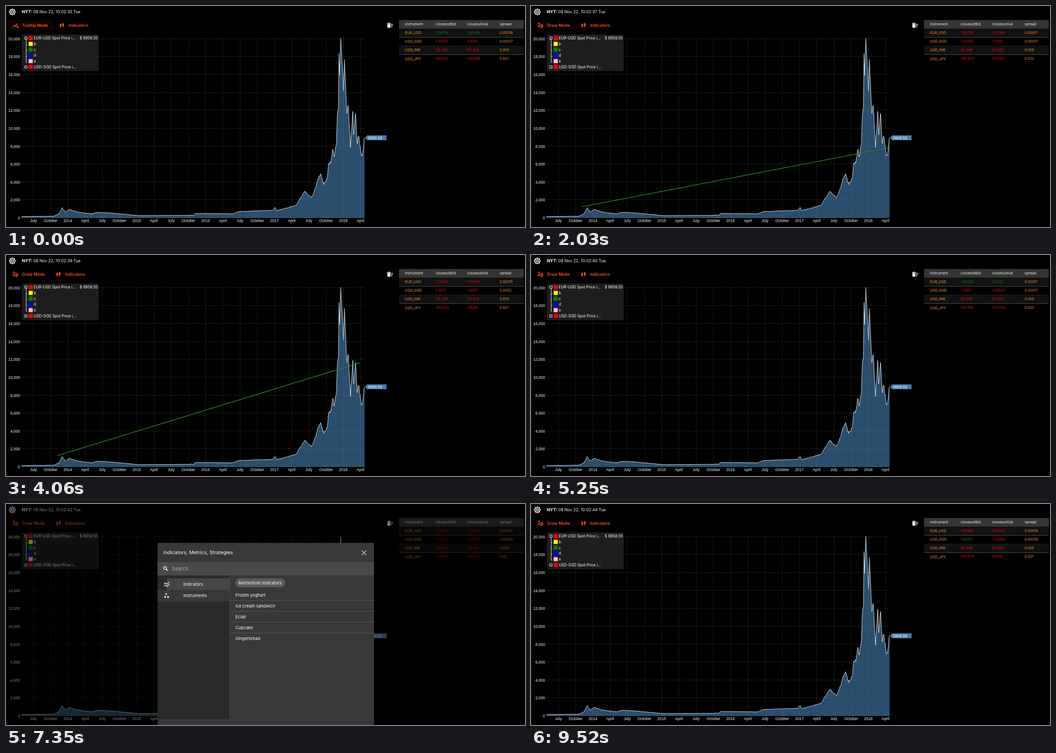
Animation, 1145 px wide and 489 px high, one loop 9.73 s. Source, as an HTML page with a canvas:

```html
<!DOCTYPE html>
<html lang="en">
<head>
<meta charset="utf-8">
<title>Market dashboard</title>
<style>
html, body { margin: 0; width: 100%; height: 100%; overflow: hidden; background: #000; }
canvas { display: block; width: 1145px; height: 489px; }
</style>
</head>
<body>
<canvas id="stage"></canvas>
<script>
const W = 1145, H = 489, LOOP = 9730;
const UI = 'Inter, "Noto Sans", sans-serif';
const AXIS = '"Liberation Sans", Arial, sans-serif';
const ORANGE = '#f9501c', AMBER = '#f79a35';

const dpr = window.devicePixelRatio || 1;
const stage = document.getElementById('stage');
const modalLayer = document.createElement('canvas');
const [screen, overlay] = [stage, modalLayer].map(c => {
  c.width = W * dpr;
  c.height = H * dpr;
  const g = c.getContext('2d');
  g.scale(dpr, dpr);
  return g;
});
let ctx = screen;

// ---- helpers ----
function text(s, x, y, size, color = '#fff', { weight = 400, align = 'left', font = UI } = {}) {
  ctx.font = `${weight} ${size}px ${font}`;
  ctx.textAlign = align;
  ctx.fillStyle = color;
  ctx.fillText(s, x, y + size * 0.362);
}

function rect(x, y, w, h, color, r = 0) {
  ctx.fillStyle = color;
  ctx.beginPath();
  ctx.roundRect(x, y, w, h, r);
  ctx.fill();
}

function stroke(points, color, width = 1) {
  ctx.strokeStyle = color;
  ctx.lineWidth = width;
  ctx.beginPath();
  points.forEach(([x, y]) => ctx.lineTo(x, y));
  ctx.stroke();
}

function disc(x, y, r, color) {
  ctx.fillStyle = color;
  ctx.beginPath();
  ctx.arc(x, y, r, 0, Math.PI * 2);
  ctx.fill();
}

function ring(x, y, r, color, width) {
  ctx.strokeStyle = color;
  ctx.lineWidth = width;
  ctx.beginPath();
  ctx.arc(x, y, r, 0, Math.PI * 2);
  ctx.stroke();
}

const smooth = u => u * u * (3 - 2 * u);
const ramp = (t, from, to) => Math.min(1, Math.max(0, (t - from) / (to - from)));
// Rises over one interval and falls over a later one.
const pulse = (t, a, b, c, d) => ramp(t, a, b) - ramp(t, c, d);
const mix = (a, b, u) => a + (b - a) * u;

// ---- chart ----
const LEFT = 34, RIGHT = 791, BASE = 469;
const STEP_X = 37.98, STEP_Y = 39.62;
const tickX = i => 60.5 + i * STEP_X;
const tickY = i => BASE - i * STEP_Y;

// Turning points of the price; the jitter between them is random.
const turns = [
  [34, 466], [106, 465], [117, 460], [124, 446], [131, 456], [139, 450], [160, 456.5],
  [190, 460], [200, 456.5], [225, 457.5], [295, 464], [415, 463], [418, 459], [500, 460],
  [511, 455], [588, 452], [594, 446], [597, 453], [640, 441], [650, 424], [659, 410],
  [674, 424], [684, 400], [688, 382], [694, 371], [701, 395], [709, 380], [712, 348],
  [717, 346], [721, 317], [724, 334], [729, 303], [731, 243], [733.5, 225], [734.6, 105],
  [735.8, 154], [738.5, 71], [744.6, 188], [746.5, 118], [752, 238], [755, 220],
  [760, 313], [765, 233], [767, 285], [771, 238], [775, 305], [778, 288], [784, 332],
  [787, 325], [791, 291]
];

function roughen(keys) {
  let seed = 11;
  const rnd = () => (seed = seed * 16807 % 2147483647) / 2147483647 - 0.5;
  const out = [];
  for (let i = 0; i < keys.length - 1; i++) {
    const [x0, y0] = keys[i], [x1, y1] = keys[i + 1];
    const n = Math.max(1, Math.round(x1 - x0));
    for (let k = 0; k < n; k++) {
      const u = k / n, y = mix(y0, y1, u);
      const amp = Math.min(9, 0.3 + (BASE - y) * 0.06);
      out.push([mix(x0, x1, u), k ? y + rnd() * amp : y]);
    }
  }
  return [...out, keys[keys.length - 1]];
}
const curve = roughen(turns);

function drawChart() {
  const grid = 'rgba(255,255,255,0.21)';
  ctx.setLineDash([2, 2]);
  for (let i = 0; i <= 10; i++) {
    const y = Math.round(tickY(i)) - 0.5;
    stroke([[LEFT, y], [RIGHT, y]], grid);
  }
  for (let i = 0; i < 20; i++) {
    const x = Math.floor(tickX(i)) + 0.5;
    stroke([[x, BASE], [x, 70]], grid);
  }
  ctx.setLineDash([]);

  ctx.fillStyle = 'rgba(70,130,180,0.6)';
  ctx.beginPath();
  [[LEFT, BASE], ...curve, [RIGHT, BASE]].forEach(p => ctx.lineTo(...p));
  ctx.fill();
  ctx.lineJoin = 'round';
  stroke(curve, '#dde5ec');

  for (let i = 0; i <= 10; i++) {
    text((i * 2000).toLocaleString('en-US'), 31, tickY(i), 8.5, '#fff', { align: 'right', font: AXIS });
  }
  for (let i = 0; i < 20; i++) {
    const label = ['July', 'October', 2014 + (i - 2) / 4, 'April'][i % 4];
    text(String(label), tickX(i), 475, 8.5, '#fff', { align: 'center', font: AXIS });
  }

  rect(797, 286.3, 42.5, 10.7, '#4a7dad');
  ctx.beginPath();
  [[792, 291.6], [797, 286.3], [797, 297]].forEach(p => ctx.lineTo(...p));
  ctx.fill();
  text('8958.55', 799, 291.7, 8.6, '#fff', { font: AXIS });
}

function drawTrend(t) {
  if (t < 1680 || t >= 4690) return;
  const grow = ramp(t, 1680, 1960);
  const lift = smooth(ramp(t, 2380, 2660));
  const x = mix(113, mix(788, 781, lift), grow);
  const y = mix(444, mix(314, 238.5, lift), grow);
  stroke([[113, 444], [x, y]], '#1c8a1c', 1.6);
}

function drawLegend() {
  rect(35, 63, 169.5, 81, 'rgba(38,38,38,0.8)', 4);
  stroke([[44.5, 74], [44.5, 124]], '#ddd');
  const rows = [
    ['EUR-USD Spot Price i...', '#f00'], ['b', '#ff0'], ['c', '#008000'],
    ['d', '#00f'], ['e', '#ffc0cb'], ['USD-SGD Spot Price i...', '#f00']
  ];
  rows.forEach(([label, color], i) => {
    const y = 71.2 + i * 12.7;
    rect(50, y - 4.5, 9, 9, color);
    text(label, 61.3, y, 8.3);
    if (label.length > 1) {
      ctx.strokeStyle = '#fff';
      ctx.lineWidth = 1;
      ctx.strokeRect(41.5, Math.round(y) - 2.5, 5, 5);
    } else {
      stroke([[44, y + 2], [47, y + 2]], '#ddd');
    }
  });
  text('$ 8958.55', 202.5, 71, 8.3, '#fff', { align: 'right' });
}

// ---- toolbar ----
function gearIcon(x, y) {
  const pts = [];
  for (let i = 0; i <= 32; i++) {
    const a = (i - 0.5) * Math.PI / 16, r = i % 4 < 2 ? 6.6 : 5;
    pts.push([x + r * Math.cos(a), y + r * Math.sin(a)]);
  }
  stroke(pts, '#fff', 1.6);
  ring(x, y, 2.4, '#fff', 1.5);
}

function statsIcon() {
  stroke([[14.5, 48], [18, 42.5], [20.5, 44.5], [24, 38]], ORANGE, 1.3);
  ring(23.5, 44.5, 2.6, ORANGE, 1.3);
  stroke([[25.4, 46.4], [28, 49]], ORANGE, 1.4);
}

function gestureIcon() {
  ctx.strokeStyle = ORANGE;
  ctx.lineWidth = 1.5;
  ctx.beginPath();
  ctx.moveTo(15, 39.5);
  ctx.bezierCurveTo(18, 36, 21, 38, 18.5, 41);
  ctx.bezierCurveTo(14.5, 45, 15.5, 48, 18.5, 45.5);
  ctx.bezierCurveTo(21, 41, 25, 38.5, 25, 43);
  ctx.bezierCurveTo(25, 49, 20.5, 49, 21.5, 46.5);
  ctx.bezierCurveTo(22.5, 44, 24.5, 43.6, 27.5, 43.6);
  ctx.stroke();
}

function candleIcon(x) {
  for (const [cx, top] of [[x + 2.5, 38], [x + 8, 37]]) {
    stroke([[cx, top], [cx, top + 10.5]], ORANGE, 1.2);
    rect(cx - 1.8, top + 2, 3.6, 5.5, ORANGE);
  }
}

function sweepIcon() {
  rect(841.5, 40, 6.5, 8, '#fff', 1);
  rect(840.5, 38, 8.5, 1.4, '#fff');
  rect(843, 37.2, 3.5, 1.2, '#fff');
  for (let i = 0; i < 3; i++) rect(849.2, 40 + i * 2.8, 4.8 - i, 1.3, '#fff');
}

function drawToolbar(t) {
  gearIcon(14, 13);
  text('NYT:', 35, 13, 9.3, '#fff', { weight: 700 });
  const sec = 35 + Math.floor((t + 638) / 1058);
  text(`08 Nov 22, 10:02:${sec} Tue`, 60, 13, 9);

  const draw = t >= 210;
  const modeHover = 1 - ramp(t, 800, 1000);
  const indHover = pulse(t, 5900, 6050, 6150, 6400);
  if (modeHover) rect(5, 32, draw ? 93 : 100, 22, `rgba(249,80,28,${0.06 * modeHover})`, 3);
  if (indHover) rect(106, 31, 82, 23, `rgba(249,80,28,${0.24 * indHover})`, 3);

  const bold = { weight: 600 };
  const x = draw ? 110.5 : 118;
  if (draw) gestureIcon(); else statsIcon();
  text(draw ? 'Draw Mode' : 'Tooltip Mode', 35.7, 43, 9.1, ORANGE, bold);
  candleIcon(x);
  text('Indicators', x + 20, 43, 9.1, ORANGE, bold);
  sweepIcon();
}

// ---- quotes: bids and spreads in pips, one per update ----
const updates = [1470, 3500, 5110, 7000, 8400, 8890];
const quotes = [
  { name: 'EUR_USD', digits: 5, base: 100000, bids: [173, 179, 183, 203, 192, 188, 188],
    spreads: [16, 17, 15, 17, 17, 17, 16], bidUp: [0, 3], askUp: [0, 3] },
  { name: 'USD_SGD', digits: 5, base: 140100, bids: [33, 33, 30, 30, 32, 31, 31],
    spreads: [17, 17, 20, 17, 15, 18, 18], bidUp: [6] },
  { name: 'USD_INR', digits: 3, base: 83249 },
  { name: 'USD_JPY', digits: 3, base: 145800, bids: [27, 33, 29, 16, 18, 27, 29],
    spreads: [21, 22, 21, 22, 20, 21, 21] }
];
const columns = [880, 948, 1017.5, 1089];

function drawTable(t) {
  const step = updates.filter(u => t >= u).length;
  const tint = up => up && up.includes(step) ? '#168a16' : '#ee0808';
  rect(867, 31, 275.5, 19, '#353535');
  ['instrument', 'closeoutBid', 'closeoutAsk', 'spread'].forEach((s, i) => text(s, columns[i], 40.5, 7.95, '#eee'));
  quotes.forEach((q, i) => {
    const y = 50 + i * 19.15, mid = y + 9.2;
    if (i % 2 === 0) rect(867, y, 275.5, 19, '#111');
    if (i < 3) rect(867, Math.round(y + 18.6), 275.5, 1, '#515151');
    const price = pips => String(pips / 10 ** q.digits);
    const bid = q.base + (q.bids ? q.bids[step] : 0);
    const spread = q.spreads ? q.spreads[step] : 55;
    text(q.name, columns[0], mid, 8.05, AMBER);
    text(price(bid), columns[1], mid, 7.75, tint(q.bidUp));
    text(price(bid + spread), columns[2], mid, 7.75, tint(q.askUp));
    text(price(spread), columns[3], mid, 7.75, AMBER);
  });
}

// ---- dialog ----
function drawModal(t) {
  rect(334.5, 86, 477.5, 420, '#383838', 3);
  text('Indicators, Metrics, Strategies', 347, 107.5, 10.9);
  stroke([[785, 103], [795, 113]], '#ddd', 1.3);
  stroke([[795, 103], [785, 113]], '#ddd', 1.3);

  rect(334.5, 128.5, 477.5, 29.5, '#4a4a4a');
  ring(351, 141.8, 3.1, '#fff', 1.4);
  stroke([[353.3, 144.1], [357.3, 148]], '#fff', 1.6);
  text('Search', 366, 143.5, 11, '#a9a9a9');

  rect(334.5, 158, 158.5, 318, '#2a2a2a');
  const hoverA = pulse(t, 7080, 7220, 7350, 7500);
  const hoverB = pulse(t, 7280, 7420, 7840, 8050);
  rect(355, 164.5, 138, 25.5, `rgba(255,255,255,${0.13 * hoverA})`);
  rect(334.5, 190, 158.5, 25.5, `rgba(255,255,255,${0.13 * hoverB})`);
  rect(493, 158, 1, 318, '#484848');

  for (const y of [175.5, 180.5]) {
    stroke([[348.5, y + 1.5], [351.5, y - 1], [355, y + 2], [360.5, y - 3]], '#fff', 1.4);
  }
  disc(351, 205.5, 2, '#fff');
  disc(353.3, 199.2, 1.8, '#fff');
  disc(357.5, 205.8, 2.1, '#fff');
  text('Indicators', 391, 177.5, 9.35);
  text('Instruments', 391, 203, 9.35);

  rect(506, 164.5, 110, 19.5, '#5b5b5b', 9.75);
  text('Momentum Indicators', 512.8, 174.3, 9.25);
  ['Frozen yoghurt', 'Ice cream sandwich', 'Eclair', 'Cupcake', 'Gingerbread'].forEach((s, i) => {
    text(s, 506, 201.8 + i * 24.05, 9.3);
    if (i < 4) rect(494, Math.round(212.8 + i * 24.1), 318, 1, '#595959');
  });
}

function drawDialog(t) {
  const alpha = smooth(pulse(t, 6010, 6230, 9310, 9505));
  if (!alpha) return;
  rect(0, 0, W, H, `rgba(0,0,0,${0.5 * alpha})`);
  ctx = overlay;
  ctx.clearRect(0, 0, W, H);
  drawModal(t);
  ctx = screen;
  ctx.globalAlpha = alpha;
  ctx.drawImage(modalLayer, 0, 0, W, H);
  ctx.globalAlpha = 1;
}

const start = performance.now();
function frame() {
  const t = Math.max(0, performance.now() - start) % LOOP;
  rect(0, 0, W, H, '#000');
  rect(0, 0, 1, H, '#222');
  drawChart();
  drawTrend(t);
  drawLegend();
  drawToolbar(t);
  drawTable(t);
  drawDialog(t);
  requestAnimationFrame(frame);
}
frame();
</script>
</body>
</html>
```
